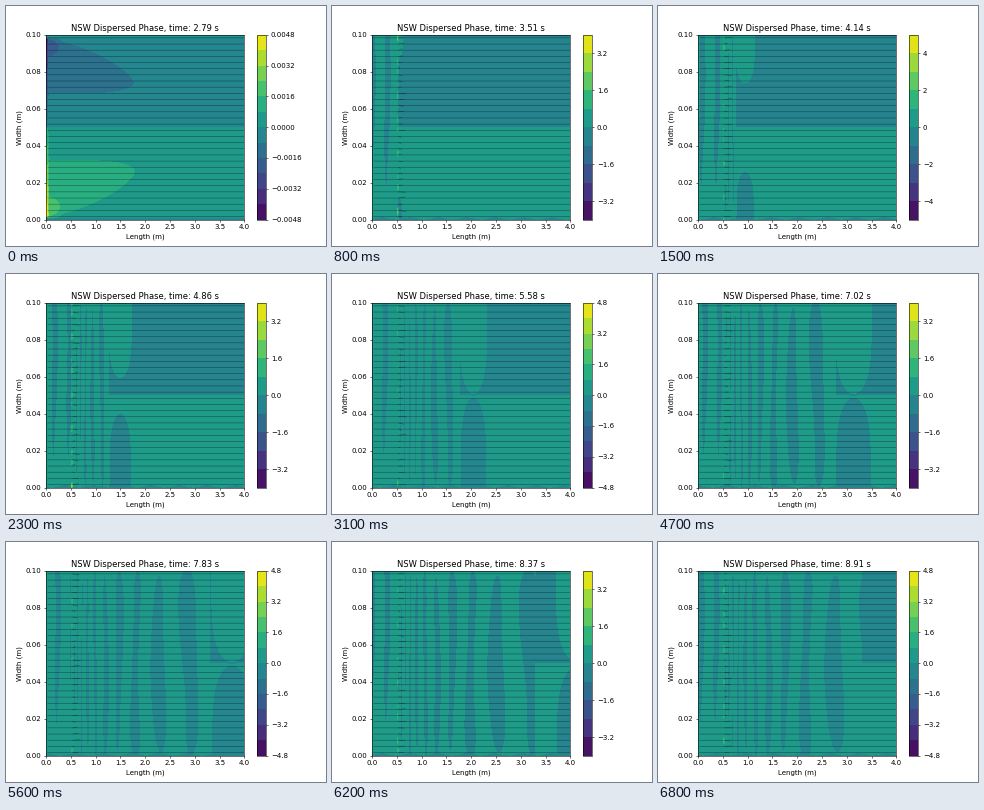
Animation, 320 px wide and 240 px high, one loop 6.9 s. Source, as a matplotlib script:

```python
import numpy as np
import matplotlib.pyplot as plt
from matplotlib.animation import FuncAnimation

FRAMES, STEP = 69, 100
ONSET = 8       # the pulse starts here
SOURCE = 0.5    # where it enters
RATIO = 0.76    # spacing of successive stripes

plt.rcParams["font.family"] = "DejaVu Sans"
fig = plt.figure(figsize=(6.4, 4.8), dpi=50)
ax = fig.add_axes([0.125, 0.11, 0.62, 0.77])
cax = fig.add_axes([0.78375, 0.11, 0.028875, 0.77])

X, Y = np.meshgrid(np.linspace(0, 4, 501), np.linspace(0, 0.1, 141))
WALL = np.minimum(Y, 0.1 - Y)  # distance to the nearer wall
SIDE = np.where(Y < 0.05, 1, -1)
ROWS = np.arange(0.5, 30) * 0.1 / 30


def calm(n):
    """Steady inflow, antisymmetric about the centre line."""
    tip = 1.78 + 0.02 * n
    r = np.clip(X / tip, 0, 1)
    lo, hi = 0.002 + 0.018 * r ** 1.5, 0.032
    g = 1 - ((WALL - (lo + hi) / 2) / ((hi - lo) / 2)) ** 2 - (X / tip) ** 6
    m = np.clip(0.0008 + 0.0006 * g, 0.0003, 0.0013)
    core = 1 - (X / 0.27) ** 2 - ((WALL - 0.007) / 0.005) ** 2
    m = np.maximum(m, np.clip(0.0016 + 0.0008 * core, 0, 0.0021))
    inlet = 0.0047 * (1 - WALL / 0.06) * np.clip(1.4 - X / 0.06, 0, 1)
    m = np.where(WALL > 0.002, np.maximum(m, inlet), m)
    return SIDE * np.where(WALL < 0.0014, -0.0003, m)


def wake(back):
    """Stripes behind the front, narrower towards the source."""
    d = np.clip(X - SOURCE, 0, 4)
    turn = np.log((d + 0.15) / (back + 0.15)) / np.log(RATIO)
    phase = 2 * np.pi * (turn - 0.6) + 0.5 * np.sin(45 * Y + 1.3 * turn)
    taper = 0.9 * np.abs(20 * Y - 1) ** 8
    sway = 0.3 * np.sin(50 * Y + 2.4 * np.round(turn - 0.6))
    return 0.1 + taper + sway - np.cos(phase)


def upstream(n):
    """Weak wave drifting from the inlet to the source."""
    phase = 2 * np.pi * (X - 0.08 - 0.011 * (n - 15)) / 0.3
    return 0.25 + 1.1 * np.clip(1 - Y / 0.05, 0, 1) - np.cos(phase + 0.4 * np.sin(60 * Y))


def ahead(n, reach, half):
    """Undisturbed flow, with one lobe of opposite sign on each wall."""
    height = np.clip(0.026 + 0.0018 * (n - 15), 0.005, 0.049)
    lobe = 1 - ((X - SOURCE - reach) / half) ** 2 - (WALL / height) ** 4
    return SIDE * np.minimum((0.05 - WALL) / 0.01 + 0.2, -2 * lobe)


def pulsed(n):
    """Near-zero field whose sign carries the stripes."""
    reach = 0.45 + 0.0683 * (n - 15)
    half = 0.15 + 0.08 * reach
    back = max(reach - half, 0.02)
    field = np.where(X < SOURCE, upstream(n), wake(back))
    field = np.where(X > SOURCE + min(back, 2.8), ahead(n, reach, half), field)
    ripple = 0.0009 + 0.0006 * np.sin(11 * X + 0.7 * n)
    field = np.clip(np.minimum(field, (Y - ripple) * 400), -0.5, 0.5)

    fleck = np.clip(np.sin(700 * Y + n) * np.sin(310 * Y - 2 * n), 0, 1)
    jet = (0.8 + 2.4 * np.exp(-Y / 0.005) + 0.8 * np.exp((Y - 0.1) / 0.02)) * fleck
    return field + jet * np.exp(-((X - 0.52) / 0.009) ** 2)


def levels(n):
    if n < ONSET:
        return np.arange(-6, 7) * 0.0008
    c = np.cos(2 * np.pi * (n - 15) / 13.5)
    if c > 0.985:
        return np.arange(-5, 6) * 1.0
    m = 6 if c > 0 else 5
    return np.arange(-m, m + 1) * 0.8


def draw_flow(n):
    ax.hlines(ROWS, 0.03, 4, color="black", lw=0.75, alpha=0.5, snap=False)
    if n >= ONSET:
        rng = np.random.default_rng(n)
        size = rng.uniform(0.02, 0.15, len(ROWS))
        tilt = rng.normal(0, 0.0003, len(ROWS))
        ax.plot([0.54 + 0 * size, 0.54 + size], [ROWS, ROWS + tilt],
                color="black", lw=0.8, alpha=0.45, snap=False)


def draw(n):
    ax.clear()
    cax.clear()
    field = calm(n) if n < ONSET else pulsed(n)
    filled = ax.contourf(X, Y, field, levels=levels(n), cmap="viridis")
    draw_flow(n)
    fig.colorbar(filled, cax=cax)
    ax.set(xlim=(0, 4), ylim=(0, 0.1), xlabel="Length (m)", ylabel="Width (m)",
           xticks=np.arange(0, 4.1, 0.5), yticks=np.arange(0, 0.11, 0.02))
    ax.set_title(f"NSW Dispersed Phase, time: {2.79 + 0.09 * n:.2f} s")
    return []


anim = FuncAnimation(fig, draw, frames=FRAMES, interval=STEP, repeat=True,
                     repeat_delay=0, init_func=lambda: draw(0))
plt.show()
```
